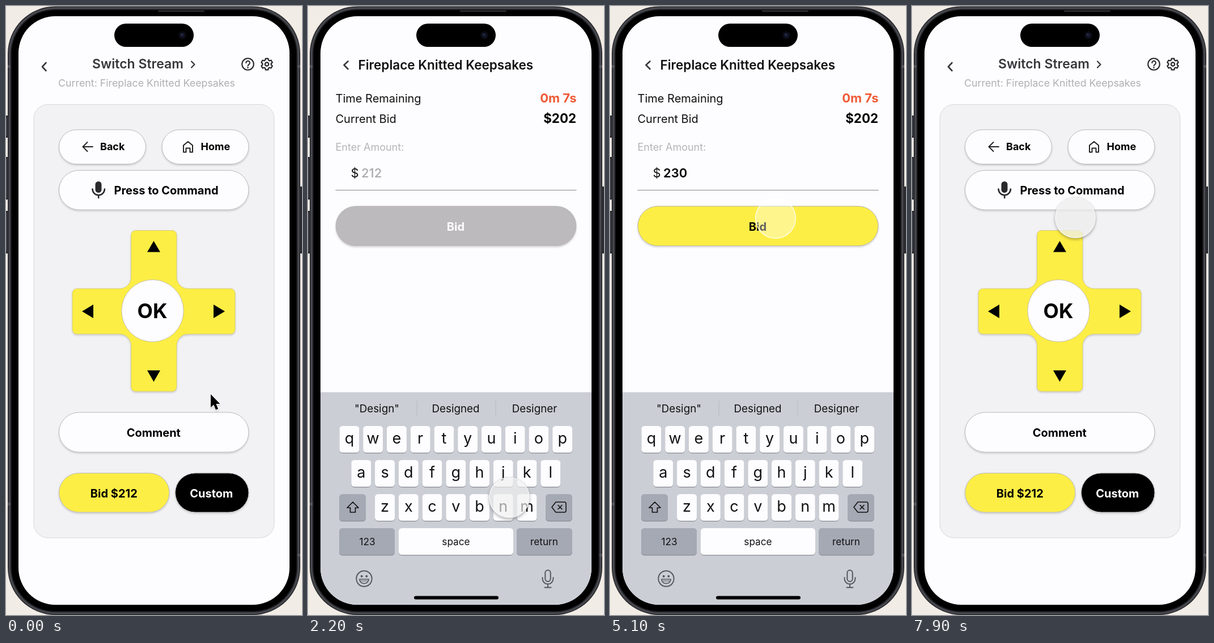
Animation of 522 by 1073 pixels, one loop 8 s. Source, as an HTML page:

```html
<!DOCTYPE html>
<html lang="en">
<head>
<meta charset="utf-8">
<title>Remote bidding</title>
<style>
html, body { margin: 0; width: 100%; height: 100%; overflow: hidden; background: #f2ece6; }
svg { display: block; width: 100%; height: 100%; }
text { font-family: Inter, "Liberation Sans", sans-serif; }
.line { fill: none; stroke-linecap: round; stroke-linejoin: round; }
.pill { stroke: #b9b8bc; stroke-width: 1; filter: url(#lift); }
</style>
</head>
<body>
<svg id="stage" viewBox="0 0 522 1073" preserveAspectRatio="none">
  <defs>
    <filter id="lift" x="-10%" y="-20%" width="120%" height="150%">
      <feDropShadow dx="0" dy="2" stdDeviation="1.6" flood-opacity=".16"/>
    </filter>
    <filter id="soft" x="-40%" y="-40%" width="180%" height="180%">
      <feDropShadow dx="0" dy="2.5" stdDeviation="2.5" flood-opacity=".3"/>
    </filter>
    <clipPath id="screen"><rect x="22" y="18" width="478" height="1037" rx="65"/></clipPath>
    <mask id="rim">
      <rect x="-50" y="-50" width="100" height="100" fill="#fff"/>
      <circle r="35" fill="#000"/>
    </mask>
  </defs>
  <g id="phone"></g>
  <g clip-path="url(#screen)">
    <rect x="22" y="18" width="478" height="1037" fill="#fdfcfe"/>
    <g id="remote"></g>
    <g id="bidding"></g>
  </g>
  <g id="island"></g>
  <g id="touch">
    <circle id="shade" r="36" fill="#777" filter="url(#soft)" mask="url(#rim)"/>
    <circle id="disc" r="36"/>
    <circle r="35.2" fill="none" stroke="#fff" stroke-opacity=".75" stroke-width="1.5"/>
  </g>
  <path id="arrow" d="M0 0V23.5L5.2 18.6 9 27.5 13.2 25.7 9.4 17H16.5Z" fill="#000" stroke="#fff"
    stroke-width="1.8" stroke-linejoin="round" paint-order="stroke" filter="url(#lift)"/>
</svg>
<script>
const LOOP = 8000;
const YELLOW = "#fdee45";
const $ = id => document.getElementById(id);

const box = (x, y, x2, y2, r, fill, extra = "") =>
  `<rect x="${x}" y="${y}" width="${x2 - x}" height="${y2 - y}" rx="${r}" fill="${fill}" ${extra}/>`;
const label = (s, x, y, size, weight = 400, fill = "#000", anchor = "start", extra = "") =>
  `<text x="${x}" y="${y}" font-size="${size}" font-weight="${weight}" fill="${fill}" text-anchor="${anchor}" ${extra}>${s}</text>`;
const line = (d, color = "#222", w = 2, extra = "") =>
  `<path class="line" d="${d}" stroke="${color}" stroke-width="${w}" ${extra}/>`;
const dot = (x, y, r, fill, extra = "") => `<circle cx="${x}" cy="${y}" r="${r}" fill="${fill}" ${extra}/>`;
const pill = (x, y, x2, y2, fill = "#fdfcfe") => box(x + .5, y + .5, x2 - .5, y2 - .5, (y2 - y) / 2, fill, 'class="pill"');

function drawPhone() {
  const sides = [[193, 232], [266, 341], [361, 436]]
    .map(([a, b]) => box(-4, a, 5, b, 2, "#2c2d32") + box(0, a + 3, 1.5, b - 3, 0, "#4b4c52")).join("");
  const seams = [[3, 104], [514, 104], [3, 875], [514, 965]]
    .map(([x, y]) => box(x, y, x + 5, y + 5, 0, "#55565b")).join("");
  const shells = [[0, "#2b2c30"], [1.8, "#4a4b51"], [4.2, "#34353a"], [5.6, "#17171a"], [7, "#000"]]
    .map(([d, c]) => box(3 + d, .5 + d, 519 - d, 1073 - d, 84 - d, c)).join("");
  return sides + box(517, 318, 526, 436, 2, "#2c2d32") + shells + seams +
    box(268, 7.5, 350, 10.5, 1.5, "#2a2a2d");
}

function gear(cx, cy) {
  const pts = [];
  for (let k = 0; k < 6; k++)
    for (const [da, r] of [[-22, 7.7], [-13, 10.2], [13, 10.2], [22, 7.7]]) {
      const a = (k * 60 - 90 + da) * Math.PI / 180;
      pts.push((cx + r * Math.cos(a)).toFixed(2) + " " + (cy + r * Math.sin(a)).toFixed(2));
    }
  return line("M" + pts.join("L") + "Z", "#27272a", 2.2) +
    dot(cx, cy, 3.2, "none", 'stroke="#27272a" stroke-width="2.2"');
}

function drawRemote() {
  const ink = "#37373b";
  const cross = "M228 395.5H293a8 8 0 0 1 8 8V478a20 20 0 0 0 20 20H396a8 8 0 0 1 8 8V570a8 8 0 0 1-8 8H321" +
    "a20 20 0 0 0-20 20V671a8 8 0 0 1-8 8H228.5a8 8 0 0 1-8-8V598a20 20 0 0 0-20-20H125a8 8 0 0 1-8-8V506" +
    "a8 8 0 0 1 8-8H200.5a20 20 0 0 0 20-20V403.5a8 8 0 0 1 8-8Z";
  return line("M70.5 100L64 107 70.5 114", ink, 2.6) +
    label("Switch Stream", 232.5, 110, 23, 600, ink, "middle") +
    line("M327 97.5L332.5 103 327 108.5", ink, 2.2) +
    label("Current: Fireplace Knitted Keepsakes", 248, 141.5, 17.8, 400, "#b0b0b3", "middle") +
    dot(426.5, 102.5, 10.3, "none", 'stroke="#27272a" stroke-width="2.1"') +
    line("M423.3 100.3a3.3 3.3 0 1 1 5.4 2.3C427.2 103.7 426.5 104.3 426.5 105.5", "#27272a", 2) +
    dot(426.5, 108.6, 1.3, "#27272a") + gear(460, 102.5) +
    box(49, 173.5, 473, 937, 25, "#f2f1f3", 'stroke="#d7d6d9"') +
    pill(93, 217.5, 247, 279) + pill(274.5, 217.5, 428.5, 279) + pill(93, 289, 428.5, 359.5) +
    line("M153 248H136M143.5 240L135.5 248 143.5 256", "#222", 1.9) +
    label("Back", 166, 254, 18, 700) +
    line("M313 245.5L321 239 329 245.5V257.5H324.5V250.5H317.5V257.5H313Z", "#222", 2) +
    label("Home", 343.5, 254, 18, 700) +
    box(157.5, 309, 168.5, 329, 5.5, "#2a2a2c") +
    line("M152.5 322.5a10.7 10.7 0 0 0 21.4 0M163.2 333.5V338", "#2a2a2c", 2.6) +
    label("Press to Command", 282.5, 331.5, 20, 700, "#000", "middle") +
    `<path d="${cross}" fill="${YELLOW}" stroke="#c9c37c" stroke-width=".8" filter="url(#lift)"/>` +
    `<path d="M260.5 414L272 433.5H249ZM134 538L154 526V550ZM386 538L366 526V550ZM260.5 662L272 642H249Z"/>` +
    dot(258.5, 537, 54.7, "#fdfcfe", 'stroke="#c2bfa6"') +
    label("OK", 258, 550, 35.5, 700, "#000", "middle") +
    pill(93, 715.5, 428.5, 786.5) + label("Comment", 260.3, 758.5, 20, 700, "#000", "middle") +
    pill(93, 822.5, 288.5, 892.5, YELLOW) + label("Bid $212", 190.3, 865.5, 20, 700, "#000", "middle") +
    pill(298, 822.5, 428.5, 892.5, "#000") + label("Custom", 362.3, 865.5, 20, 700, "#fff", "middle");
}

function key(x, y, x2, fill = "#fdfcfe") {
  return box(x, y + 1.2, x2, y + 48.2, 5.5, "#898c93") + box(x, y, x2, y + 47, 5.5, fill);
}

function drawKeyboard() {
  const grey = "#a5a9b4", ink = "#111", icon = "#54575d", step = 41.75;
  let out = box(22, 680.5, 500, 1056, 0, "#cbced5");
  ['"Design"', "Designed", "Designer"].forEach((s, i) =>
    out += label(s, 121.5 + i * 139, 716, 18.8, 400, ink, "middle"));
  out += line("M192 696V723M331 696V723", "#b7bac1", 1);
  ["qwertyuiop", "asdfghjkl", "zxcvbnm"].forEach((row, r) =>
    [...row].forEach((c, i) => {
      const x = 260.8 + (i - (row.length - 1) / 2) * step, y = 740 + r * 60;
      out += key(x - 17.5, y, x + 17.5) + label(c, x, y + 31, 27, 400, ink, "middle");
    }));
  out += key(55, 860, 102, grey) + key(419, 860, 466, grey) +
    line("M79 874L89 884H83.5V892H74.5V884H69Z", ink, 1.7) +
    line("M437 874H452a3 3 0 0 1 3 3V889a3 3 0 0 1-3 3H437L430 883ZM441 879.5L448 886.5M448 879.5L441 886.5", ink, 1.6) +
    key(55, 920, 153, grey) + key(160, 920, 362) + key(368, 920, 466, grey);
  [["123", 104.5], ["space", 261], ["return", 416.5]].forEach(([s, x]) =>
    out += label(s, x, 950, 17.2, 400, ink, "middle"));
  return out + dot(99, 1009, 13.7, "none", `stroke="${icon}" stroke-width="2"`) +
    dot(94.7, 1004.7, 2, icon) + dot(103.3, 1004.7, 2, icon) +
    line("M90.8 1010H107.2a8.2 7.6 0 0 1-16.4 0Z", icon, 1.6) + line("M92 1013H106", icon, 1.2) +
    box(418.3, 994, 427.7, 1014, 4.7, "none", `stroke="${icon}" stroke-width="2"`) +
    line("M413.5 1007V1009a9.5 9.5 0 0 0 19 0V1007M423 1018.5V1024M417.5 1024.5H428.5", icon, 1.9) +
    box(187, 1039.5, 336, 1045.5, 3, "#000");
}

function drawBidding() {
  return line("M70.5 97.5L63.5 104 70.5 111", "#37373b", 2.6) +
    label("Fireplace Knitted Keepsakes", 88.5, 112, 22.5, 600, "#111") +
    label("Time Remaining", 48.5, 170, 20, 400, "#111") +
    label("0m 7s", 473.5, 170, 22, 700, "#ee5a35", "end") +
    label("Current Bid", 48.5, 205.5, 20, 400, "#111") +
    label("$202", 473, 205.5, 22.3, 700, "#000", "end") +
    label("Enter Amount:", 48.5, 254.5, 18, 400, "#b5b5b8") +
    label("$", 75.5, 302, 22, 400, "#111") +
    label("212", 94, 302, 22, 500, "#aaa9ad", "start", 'id="amount"') +
    line("M49 324.5H473", "#85848a", 1.2) +
    box(49, 352.8, 473, 422.6, 34.9, "#bcbabd", 'id="send" class="pill"') +
    label("Bid", 260.5, 395.5, 20, 700, "#fff", "middle", 'id="sendText"') +
    drawKeyboard();
}

$("phone").innerHTML = drawPhone();
$("remote").innerHTML = drawRemote();
$("bidding").innerHTML = drawBidding();
$("island").innerHTML = box(191, 31, 331, 72, 20.5, "#000") +
  dot(311, 51.5, 7, "#0b0c14") + dot(311, 51.5, 3.5, "#171a30") + dot(309.5, 50, 1.3, "#343a5c");

// time, x, y, disc grey level, disc opacity, shadow
const MOVES = [
  [0, 361, 684, 240, .65, 1], [300, 361, 684, 240, .65, 1], [1400, 286, 863, 240, .65, 1],
  [1500, 286, 863, 240, .65, 1], [2000, 355, 866, 240, .65, 1], [2400, 355, 866, 240, .65, 1],
  [3200, 305, 298, 240, .8, 1], [4300, 305, 298, 240, .8, 1], [4900, 292, 374, 255, .38, 0],
  [6400, 292, 374, 255, .38, 0], [6700, 288, 373, 238, .75, 1], [LOOP, 288, 373, 238, .75, 1]
];

function poseAt(t) {
  const i = MOVES.findIndex((m, n) => n && t <= m[0]);
  const a = MOVES[i - 1], b = MOVES[i];
  const p = (t - a[0]) / (b[0] - a[0]), e = p * p * (3 - 2 * p);
  return a.slice(1).map((v, k) => v + (b[k + 1] - v) * e);
}

function set(id, attrs) {
  for (const k in attrs) $(id).setAttribute(k, attrs[k]);
}

function render(t) {
  const bidding = t >= 2100 && t < 6500;
  const filled = t >= 3400;
  const pointer = t < 1800;
  const [x, y, tone, alpha, shade] = poseAt(t);
  const at = `translate(${x} ${y})`;
  set("remote", { display: bidding ? "none" : "inline" });
  set("bidding", { display: bidding ? "inline" : "none" });
  $("amount").textContent = filled ? "230" : "212";
  set("amount", { fill: filled ? "#000" : "#aaa9ad", "font-weight": filled ? 600 : 500 });
  set("send", { fill: filled ? YELLOW : "#bcbabd" });
  $("send").style.stroke = filled ? "#b5b3a8" : "#bcbabd";
  set("sendText", { fill: filled ? "#000" : "#fff" });
  set("arrow", { display: pointer ? "inline" : "none", transform: at });
  set("touch", { display: pointer ? "none" : "inline", transform: at });
  set("disc", { fill: `rgb(${[tone, tone, tone].map(Math.round)})`, "fill-opacity": alpha });
  set("shade", { opacity: shade });
}

function tick() {
  render(performance.now() % LOOP);
  requestAnimationFrame(tick);
}
tick();
</script>
</body>
</html>
```
